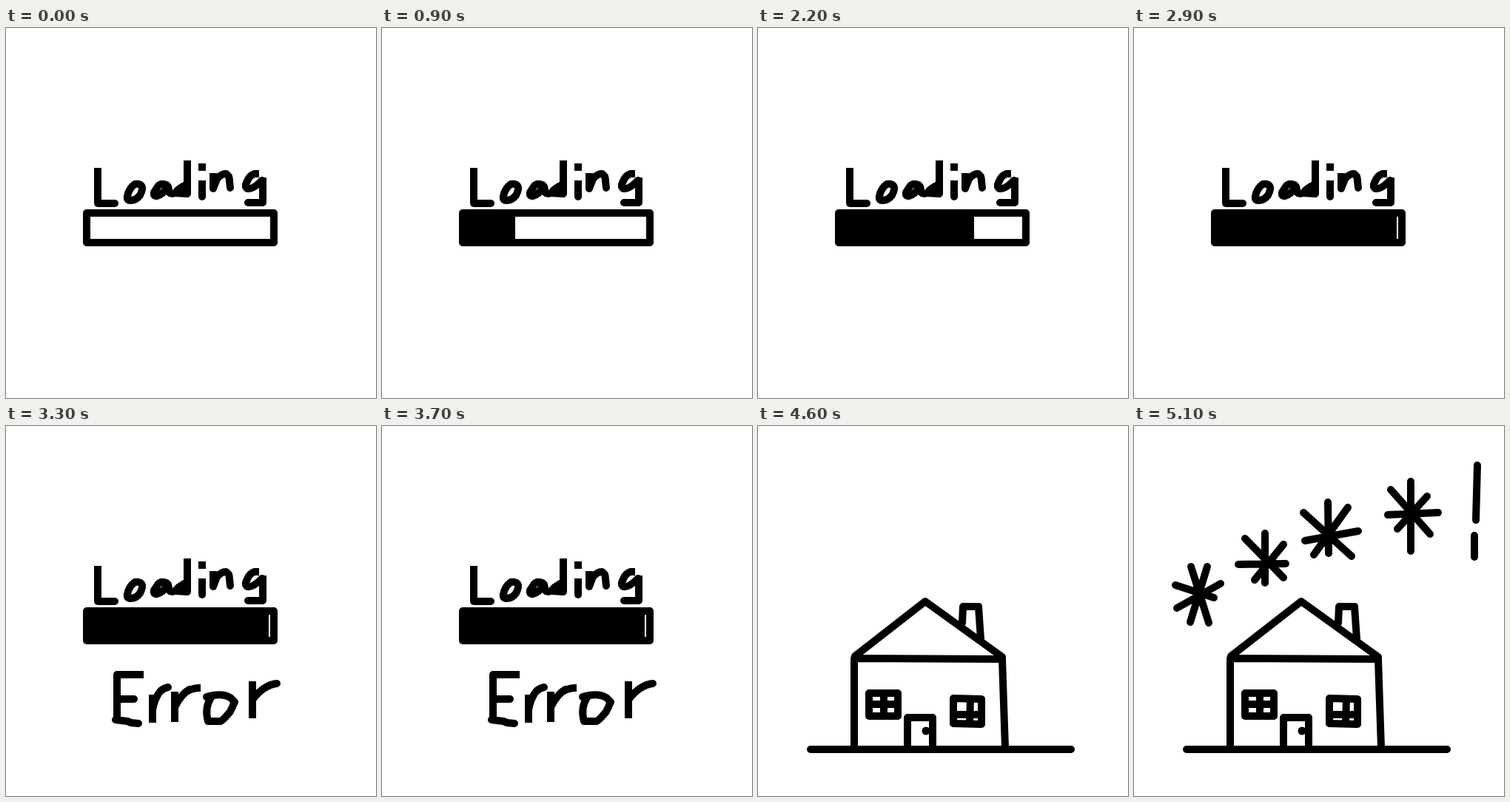
An HTML page with a canvas that plays this animation: 500x500 px, repeating every 5600 ms.

```html
<!DOCTYPE html>
<html lang="en">
<head>
<meta charset="utf-8">
<title>Loading</title>
<style>
html, body { margin: 0; width: 100%; height: 100%; overflow: hidden; background: #fff; }
canvas { display: block; width: 500px; height: 500px; }
</style>
</head>
<body>
<canvas id="stage" width="500" height="500"></canvas>
<script>
const ctx = document.getElementById('stage').getContext('2d');
const LOOP = 5600;

// Strokes are SVG path strings, drawn with one thick pen.
const pen = (path, cap = 'round') => {
  ctx.lineCap = cap;
  ctx.stroke(new Path2D(path));
};
const flat = path => pen(path, 'butt');

function drawLoading() {
  flat('M124 189V237');
  pen('M124 237H147');
  pen('M174 211Q166 217 164 227Q163 233 168 233Q176 233 181 226Q186 217 183 213Q180 210 174 211');
  pen('M217 212Q210 209 206 213L200 222Q199 228 204 227Q212 225 219 214L221 223L225 224');
  flat('M245 179V224');
  pen('M243 212Q232 217 229 223L245 224');
  flat('M260 188H270');
  flat('M265 206V226');
  pen('M265 222V228');
  flat('M280 196V216');
  pen('M280 212V217L285 204Q291 197 297 197Q302 199 302 207L303 216');
  flat('M342 197H334');
  pen('M336 197Q329 199 326 207Q322 214 326 217Q333 219 346 206');
  flat('M347 202V236');
  pen('M347 234V236H327');
}

// Filled edge at the given times; it moves on a 100 ms beat.
const fillKeys = [[0, 114], [600, 156], [1200, 203], [1800, 255], [2400, 310], [2900, 355]];

function fillEdge(time) {
  const t = Math.floor(time / 100) * 100;
  for (let i = 1; i < fillKeys.length; i++) {
    const [t0, x0] = fillKeys[i - 1], [t1, x1] = fillKeys[i];
    if (t <= t1) return x0 + (x1 - x0) * (t - t0) / (t1 - t0);
  }
  return 355;
}

function drawBar(time) {
  pen('M109 250H362V290H109Z');
  const edge = fillEdge(time);
  if (edge > 114) ctx.fillRect(112, 253, Math.round(edge) - 112, 34);
}

function drawError() {
  flat('M186 336H150');
  pen('M150 336V396');
  pen('M148 397L164 399L169 401L179 402');
  pen('M150 369H173');
  flat('M198 363V401');
  pen('M198 383Q201 368 208 359Q213 354 219 353');
  flat('M228 359V400');
  pen('M228 380Q237 362 248 356');
  flat('M244 359Q251 354 263 354');
  pen('M271 366Q291 360 303 367L309 373L303 386Q293 398 290 399L273 399Q268 381 277 367');
  flat('M333 345V395');
  pen('M333 370Q348 350 366 348');
}

function drawHouse() {
  pen('M71 437H423');
  pen('M130 437V314L330 315L334 435');
  pen('M131 311L226 237L330 312');
  pen('M276 266L277 244H298L301 288');
  pen('M150 361H189V392H150ZM170 361V392M150 376H189');
  pen('M264 368L302 369V403L264 402ZM287 369L286 402M265 390H302');
  pen('M202 434V394H236V434');
  ctx.beginPath();
  ctx.arc(227, 412, 5.5, 0, Math.PI * 2);
  ctx.fill();
}

const skyMarks = [
  'M77 190L101 266M99 190L76 265M56 215L108 232M117 213L58 246',
  'M177 145V212M150 152L202 205M202 160L163 208M141 187L205 186',
  'M262 103L263 172M229 117L294 176M289 110L243 174M231 155L303 142',
  'M374 75V169M347 86L400 146M396 95L356 139M343 120L411 117',
  'M464 53L462 127M460 148V177'
];

function draw(time) {
  ctx.fillStyle = '#fff';
  ctx.fillRect(0, 0, 500, 500);
  ctx.fillStyle = ctx.strokeStyle = '#000';
  ctx.lineWidth = 10;
  ctx.lineJoin = 'round';
  if (time >= 4600) {
    drawHouse();
    skyMarks.slice(0, Math.floor((time - 4600) / 100)).forEach(mark => pen(mark));
    return;
  }
  drawLoading();
  drawBar(time);
  const blink = time - 3300;
  if (blink >= 0 && blink < 1000 && blink % 400 < 200) drawError();
}

const start = performance.now();
function tick() {
  draw((performance.now() - start) % LOOP);
  requestAnimationFrame(tick);
}
tick();
</script>
</body>
</html>
```
